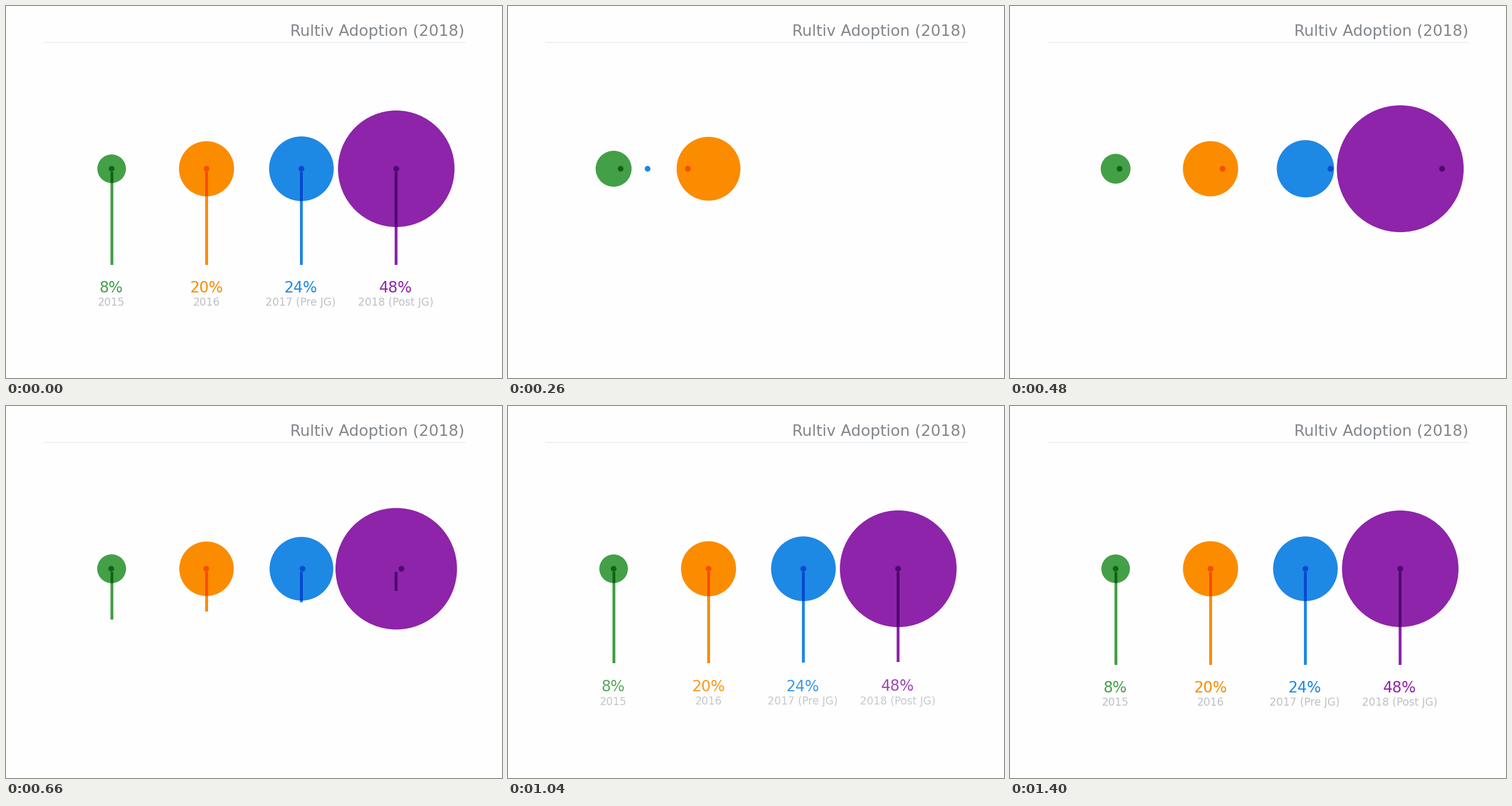
Animation of 864 by 648 pixels, one loop 5.52 s. Source, as a matplotlib script:

```python
import math

import matplotlib.pyplot as plt
import numpy as np
from matplotlib.animation import FuncAnimation
from matplotlib.colors import to_rgb
from matplotlib.patches import Circle, Rectangle

WIDTH, HEIGHT = 864, 648
STEP, LOOP = 20, 5520
PAPER = "#fefefe"
CENTER_Y, DOT_R = 283.5, 5
STEM_TOP, STEM_LEN, STEM_W = 288.5, 162, 5
SETTLE = 1320

# x, radius, colour, share, caption, label x
ITEMS = [
    (184, 24.9, "#43a047", "8%", "2015", 183),
    (349.3, 48, "#fb8c00", "20%", "2016", 349),
    (514.6, 56.3, "#1e88e5", "24%", "2017 (Pre JG)", 513.4),
    (679.8, 101.5, "#8e24aa", "48%", "2018 (Post JG)", 679),
]

plt.rcParams["font.family"] = "DejaVu Sans"
fig = plt.figure(figsize=(WIDTH / 72, HEIGHT / 72), dpi=72, facecolor=PAPER)
ax = fig.add_axes([0, 0, 1, 1])
ax.set_xlim(0, WIDTH)
ax.set_ylim(HEIGHT, 0)
ax.axis("off")


def multiply(a, b):
    return tuple(np.array(to_rgb(a)) * np.array(to_rgb(b)))


def travel(t):
    """Dot position as a fraction of its target; t is 0 on first arrival."""
    if t < 0:
        return 1 - min(-t / 92, 1) ** 1.16
    return 1 + 0.368 * math.sin(8.45 * t / 1000) * math.exp(-8.7 * t / 1000)


def bloom(t):
    """Circle radius as a fraction of its final size."""
    if t < -110:
        return 0
    if t < -32:
        return 1.37 * math.sin(math.pi / 2 * (t + 110) / 78)
    if t < 0:
        return 1.255 + 0.115 * (1 - ((t + 32) / 32) ** 2)
    return 1 + 0.26 * math.sin(math.pi * (56 - t) / 103) * math.exp(-8 * t / 1000)


def remaining(t, start, power):
    return float(np.clip((SETTLE - t) / (SETTLE - start), 0, 1)) ** power


def add_circle(x, r, color, z):
    return ax.add_patch(Circle((x, CENTER_Y), r, fc=color, lw=0, zorder=z))


def add_stem(x, color, z):
    return ax.add_patch(Rectangle((x - STEM_W / 2, STEM_TOP), STEM_W, 0,
                                  fc=color, lw=0, zorder=z))


def add_label(x, y, text, size, color, ha="center"):
    return ax.text(x, y, text, size=size, color=color, ha=ha, va="baseline")


add_label(798.5, 52.5, "Rultiv Adoption (2018)", 27, "#80868b", "right")
ax.plot([65, 799], [63, 63], color="#e2e6e8", lw=1.1)

discs, dots, stems, labels = [], [], [], []
for x, r, color, share, caption, label_x in ITEMS:
    discs.append(add_circle(x, r, color, 1))
    dots.append([add_circle(x, DOT_R, color, 3)])
    stems.append([add_stem(x, color, 3)])
    labels.append((add_label(label_x, 499, share, 26, color),
                   add_label(label_x, 522.3, caption, 18.5, "#bdc1c6")))

# Darker copies, clipped to each disc, give the multiply blend.
overlays = []
twins = [[] for _ in ITEMS]
for j, (_, _, disc_color, *_) in enumerate(ITEMS):
    for i, (x, r, color, *_) in enumerate(ITEMS):
        mix = multiply(color, disc_color)
        dots[i].append(add_circle(x, DOT_R, mix, 4))
        overlays.append((dots[i][-1], j))
        if i == j:
            stems[i].append(add_stem(x, mix, 4))
            overlays.append((stems[i][-1], j))
        if i < j:
            twins[i].append(add_circle(x, r, mix, 2))
            overlays.append((twins[i][-1], j))


def draw(frame):
    t = frame * STEP or LOOP
    for i, (x, r, *_) in enumerate(ITEMS):
        radius = r * bloom(t - 260 - 60 * i)
        for disc in [discs[i], *twins[i]]:
            disc.set_radius(radius)

        since = t - 233 - 40 * i
        for dot in dots[i]:
            dot.center = (x * travel(since), CENTER_Y)
            dot.set_radius(DOT_R if since > -92 else 0)

        length = STEM_LEN * (1 - remaining(t, 530 + 30 * i, 4))
        for stem in stems[i]:
            stem.set_height(length)

        start = 723 + 25 * i
        lift = 32 * remaining(t, start, 4)
        alpha = 1 - remaining(t, start, 3)
        for label, base in zip(labels[i], (499, 522.3)):
            label.set_y(base - lift)
            label.set_alpha(alpha)

    for patch, j in overlays:
        shown = discs[j].get_radius() > 0
        patch.set_visible(shown)
        if shown:
            patch.set_clip_path(discs[j])
    return []


anim = FuncAnimation(fig, draw, frames=LOOP // STEP, interval=STEP,
                     repeat=True, repeat_delay=0, blit=False)
plt.show()
```
